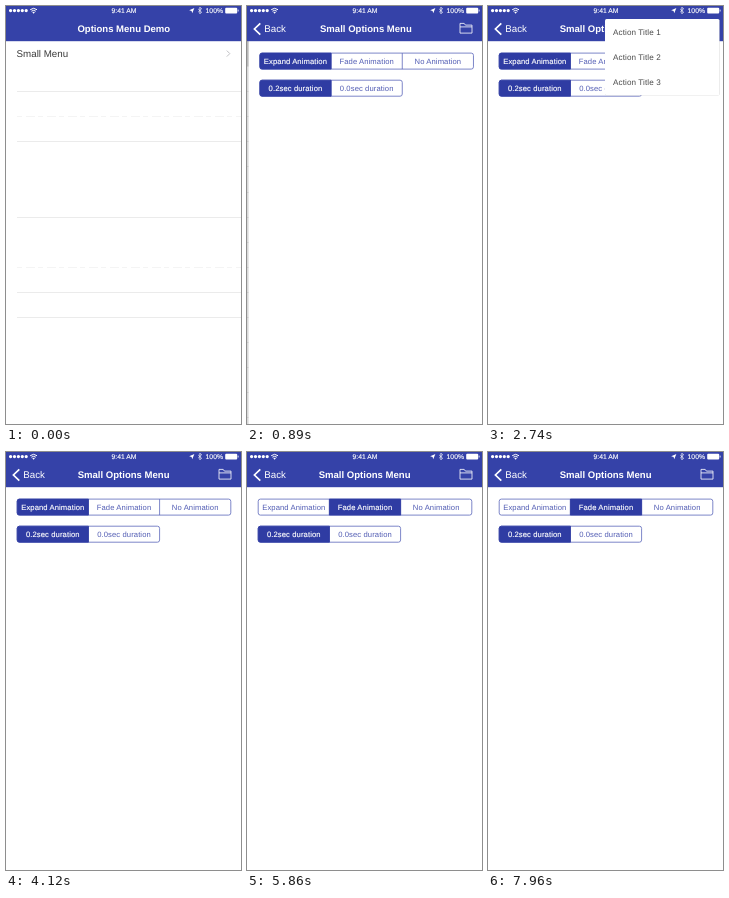
An HTML page for the animation above (8000 ms loop, 235 px wide and 418 px high).

```html
<!DOCTYPE html>
<html lang="en">
<head>
<meta charset="utf-8">
<title>Options Menu Demo</title>
<style>
  @property --push { syntax: "<number>"; inherits: true; initial-value: 0; }
  @property --grow { syntax: "<number>"; inherits: true; initial-value: 0; }
  @property --show { syntax: "<number>"; inherits: true; initial-value: 0; }

  html, body { margin: 0; width: 100%; height: 100%; overflow: hidden; background: #fff; }
  svg {
    --tint: #3542a8;
    --chosen: #2f3ca3;
    display: block; width: 235px; height: 418px;
    font: 7.65px "Liberation Sans", Arial, sans-serif;
    text-rendering: geometricPrecision;
    animation: push 8s infinite, grow 8s infinite, show 8s infinite;
  }

  /* Screen push: a critically damped spring */
  @keyframes push {
    0% { --push: 0; }
    6.25% {
      --push: 0;
      animation-timing-function: linear(0, .077 5%, .232 10%, .545, .758, .879, .942, .973, .988, .994, .998, 1);
    }
    12.5%, 100% { --push: 1; }
  }
  /* First menu expands from its corner, the second one fades */
  @keyframes grow {
    0%, 28.5% { --grow: 0; animation-timing-function: ease-in-out; }
    31%, 40.75% { --grow: 1; animation-timing-function: ease-in-out; }
    43.25%, 74% { --grow: 0; animation-timing-function: step-start; }
    74.01%, 100% { --grow: 1; }
  }
  @keyframes show {
    0%, 28.49% { --show: 0; animation-timing-function: step-start; }
    28.5%, 43.25% { --show: 1; animation-timing-function: step-start; }
    43.26%, 74.75% { --show: 0; animation-timing-function: ease-in-out; }
    77.25%, 93.75% { --show: 1; animation-timing-function: ease-in-out; }
    95.5%, 100% { --show: 0; }
  }
  @keyframes pressed { 0% { opacity: 0; } 5.75%, 100% { opacity: 1; } }
  @keyframes select { 0% { opacity: 0; } 61%, 100% { opacity: 1; } }
  @keyframes deselect { 0% { opacity: 1; } 61%, 100% { opacity: 0; } }

  .list { transform: translateX(calc(var(--push) * -70.5px)); }
  .dim { opacity: calc(var(--push) * .08); }
  .detail { transform: translateX(calc((1 - var(--push)) * 235px)); }
  .edge { opacity: calc(var(--push) * 10); }
  .pressed { animation: pressed 8s step-end infinite; }
  .on-fade { animation: select 8s step-end infinite; }
  .on-expand { animation: deselect 8s step-end infinite; }

  .title { font-size: 9.55px; font-weight: bold; text-anchor: middle; }
  .old-title {
    transform: translateX(calc(var(--push) * -60px));
    opacity: calc(1 - var(--push) * 1.7);
  }
  .new-title {
    transform: translateX(calc((1 - var(--push)) * 184px));
    opacity: var(--push);
  }
  .back { opacity: calc((var(--push) - .65) * 3); }
  .folder { opacity: var(--push); }
  .menu {
    transform-origin: 231.5px 13px;
    transform: scale(var(--grow));
    opacity: var(--show);
    filter: drop-shadow(0 .4px .7px rgba(0, 0, 0, .3));
  }
  .body { font-size: 9.75px; }
  .status { font-size: 6.8px; stroke-width: .15; }
  .status text { stroke: #fff; }
  .seg { text-anchor: middle; letter-spacing: .1px; }
  .line { stroke: #5c67ba; stroke-width: .8; fill: none; }
  .label { fill: #525db4; }
  .chosen { fill: var(--chosen); stroke: var(--chosen); stroke-width: .8; }
  .chosen-label { fill: #fff; stroke: #fff; stroke-width: .15; }
  .action { font-size: 8.1px; letter-spacing: .1px; fill: #4a4a4a; }
</style>
</head>
<body>
<svg viewBox="0 0 235 418">
  <defs>
    <linearGradient id="shadow">
      <stop offset="0" stop-color="#000" stop-opacity="0"/>
      <stop offset="1" stop-color="#000" stop-opacity=".1"/>
    </linearGradient>
    <clipPath id="titleArea"><rect width="206" height="36"/></clipPath>
  </defs>

  <g class="list">
    <rect width="235" height="418" fill="#fff"/>
    <g id="rows"></g>
    <g class="pressed">
      <g id="allRows"></g>
      <rect y="35" width="235" height="25" fill="#d9d9d9"/>
    </g>
    <text class="body" x="10.6" y="51.2" fill="#3a3a3a">Small Menu</text>
    <path d="M220.8 44.6l3 3-3 3" fill="none" stroke="#b9b9be" stroke-width=".9"/>
    <rect class="dim" width="235" height="418"/>
  </g>

  <g class="detail">
    <rect class="edge" x="-5" width="5" height="418" fill="url(#shadow)"/>
    <rect width="235" height="418" fill="#fff"/>
    <g id="controls" class="seg"></g>
  </g>

  <rect width="235" height="35.2" fill="var(--tint)"/>
  <g fill="#fff">
    <text class="title old-title" x="117.8" y="26">Options Menu Demo</text>
    <g clip-path="url(#titleArea)">
      <text class="title new-title" x="117.6" y="26">Small Options Menu</text>
    </g>
    <g class="back">
      <path d="M13.3 17.3L7.4 23l5.9 5.7" fill="none" stroke="#fff" stroke-width="1.7"/>
      <text class="body" x="17.3" y="26.4">Back</text>
    </g>
    <path class="folder" d="M213 27.1v-9.7h4.2l1.2 1.7h6.6v8zM213 20.9h12" fill="none" stroke="#fff" stroke-width=".8"/>
  </g>

  <g class="menu">
    <rect x="117" y="13" width="114.5" height="76.3" rx="1.5" fill="#fff"/>
    <g id="actions" class="action"></g>
  </g>

  <g class="status" fill="#fff">
    <path d="M4.6 4.6h15.7" stroke="#fff" stroke-width="3.3" stroke-linecap="round" stroke-dasharray="0 3.9"/>
    <path d="M24.2 3.7q3.4-2.8 6.8 0M25.4 5.2q2.2-1.7 4.4 0" fill="none" stroke="#fff" stroke-width="1"/>
    <path d="M26.3 6.2q1.3-.9 2.6 0l-1.3 1.5z"/>
    <text x="118" y="7" text-anchor="middle">9:41 AM</text>
    <path d="M188.4 2l-2.2 5.3-.6-2.4-2.4-.6z"/>
    <path d="M192.2 3l3.4 3.1-1.7 1.7V1.2l1.7 1.7-3.4 3.2" fill="none" stroke="#fff" stroke-width=".7"/>
    <text x="199.6" y="7">100%</text>
    <rect x="219.2" y="1.7" width="12" height="5.7" rx="1"/>
    <rect x="231.7" y="3.6" width=".8" height="1.9"/>
  </g>
</svg>

<script>
  const put = (id, markup) => { document.getElementById(id).innerHTML += markup; };

  const rule = (row, extra = "") => {
    const y = Math.round(60 + 25.1 * row) + .5;
    return `<path d="M11 ${y}H235" stroke="#ebebeb" ${extra}/>`;
  };
  [1, 3, 6, 9, 10].forEach(row => put("rows", rule(row)));
  [2, 8].forEach(row => put("rows", rule(row, 'stroke-dasharray="5 4 9 3" opacity=".5"')));
  for (let row = 0; row < 15; row++) put("allRows", rule(row));

  const cell = 71.2, left = 11.2, height = 16;

  function segments(y, labels, selected) {
    const label = (i, style) =>
      `<text x="${left + cell * (i + .5)}" y="${y + 10.7}" class="${style}">${labels[i]}</text>`;
    let out = `<rect class="line" x="${left}" y="${y}" width="${cell * labels.length}" height="${height}" rx="2.2"/>`;
    labels.forEach((_, i) => {
      if (i) out += `<path class="line" d="M${left + cell * i} ${y}v${height}"/>`;
    });
    // Each selectable cell is an opaque chip above a plain one
    labels.forEach((_, i) => { out += label(i, "label"); });
    for (const [i, name] of selected) {
      const x = left + cell * i, r = i ? 0 : 2.2;
      out += `<g class="${name}">
        <path class="chosen" d="M${x + cell} ${y}H${x + r}q${-r} 0 ${-r} ${r}V${y + height - r}q0 ${r} ${r} ${r}H${x + cell}z"/>
        ${label(i, "chosen-label")}</g>`;
    }
    put("controls", out);
  }
  segments(47.1, ["Expand Animation", "Fade Animation", "No Animation"], [[0, "on-expand"], [1, "on-fade"]]);
  segments(74.2, ["0.2sec duration", "0.0sec duration"], [[0, "on"]]);

  for (let i = 0; i < 3; i++)
    put("actions", `<text x="125" y="${28.6 + 25.1 * i}">Action Title ${i + 1}</text>`);
</script>
</body>
</html>
```
